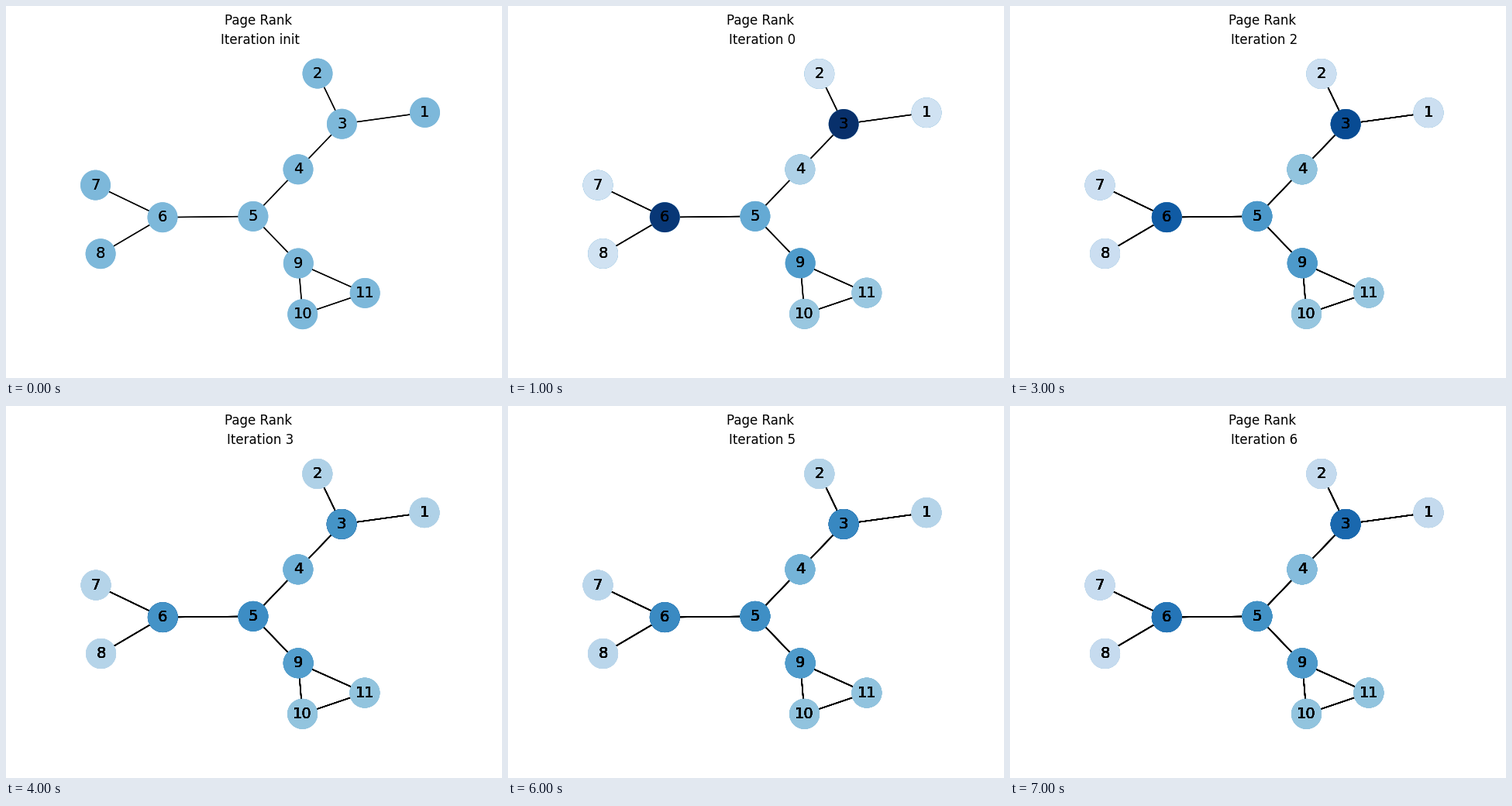
These frames come from a looping animation (640x480 px, 8000 ms). A matplotlib script:

```python
import numpy as np
import matplotlib.pyplot as plt
from matplotlib.animation import FuncAnimation
from matplotlib.collections import LineCollection

W, H, DPI = 640, 480, 100
FRAMES, DAMPING, VMAX = 8, 0.85, 0.2
CX, CY = 328, 242.4  # centre of the graph in pixels

# node centres in pixels, y down
POS = np.array([
    (540.5, 137.4), (402, 87.1), (433.4, 152.2), (377, 210.8),
    (318.9, 271.4), (202, 272.7), (115.5, 231.1), (122.1, 319.7),
    (377.3, 332), (382.7, 397.7), (463.2, 370.4),
])
EDGES = [(1, 3), (2, 3), (3, 4), (4, 5), (5, 6), (6, 7), (6, 8),
         (5, 9), (9, 10), (9, 11), (10, 11)]


def rank_history(steps):
    """Scores of every node, from the uniform start onward."""
    n = len(POS)
    links = np.zeros((n, n))
    for a, b in EDGES:
        links[a - 1, b - 1] = links[b - 1, a - 1] = 1
    flow = links / links.sum(axis=0)
    ranks = [np.full(n, 1 / n)]
    for _ in range(steps - 1):
        ranks.append((1 - DAMPING) / n + DAMPING * flow @ ranks[-1])
    return ranks


fig = plt.figure(figsize=(W / DPI, H / DPI), dpi=DPI, facecolor="white")
ax = fig.add_axes([0, 0, 1, 1])
ax.axis("off")


def caption(x, baseline, text):
    return fig.text(x / W, 1 - baseline / H, text, fontsize=12,
                    family="DejaVu Sans", ha="center", va="baseline")


def draw_layer(rank):
    """One full drawing of the graph, stacked over the earlier ones."""
    segments = [(POS[a - 1], POS[b - 1]) for a, b in EDGES]
    lines = LineCollection(segments, colors="black", linewidths=1, zorder=1)
    ax.add_collection(lines)
    dots = ax.scatter(*POS.T, s=700, c=rank, cmap="Blues", vmin=0, vmax=VMAX,
                      linewidths=1.5, zorder=2)
    labels = [ax.text(x, y, str(i), fontsize=14, family="DejaVu Sans",
                      ha="center", va="center", zorder=3)
              for i, (x, y) in enumerate(POS, 1)]
    return [lines, dots, *labels]


ranks = rank_history(FRAMES)
# the starting state is painted twice
layers = [draw_layer(rank) for rank in [ranks[0]] + ranks]
caption(325.5, 24.3, "Page Rank")
status = caption(CX, 49.3, "")


def update(i):
    zoom = 1 if i == 0 else 0.9976
    ax.set_xlim(CX - CX / zoom, CX + (W - CX) / zoom)
    ax.set_ylim(CY + (H - CY) / zoom, CY - CY / zoom)
    for k, layer in enumerate(layers):
        for artist in layer:
            artist.set_visible(k <= i + 1)
    status.set_text(f"Iteration {i - 1 if i else 'init'}")
    return []


anim = FuncAnimation(fig, update, frames=FRAMES, interval=1000,
                     repeat=True, repeat_delay=0)
plt.show()
```
